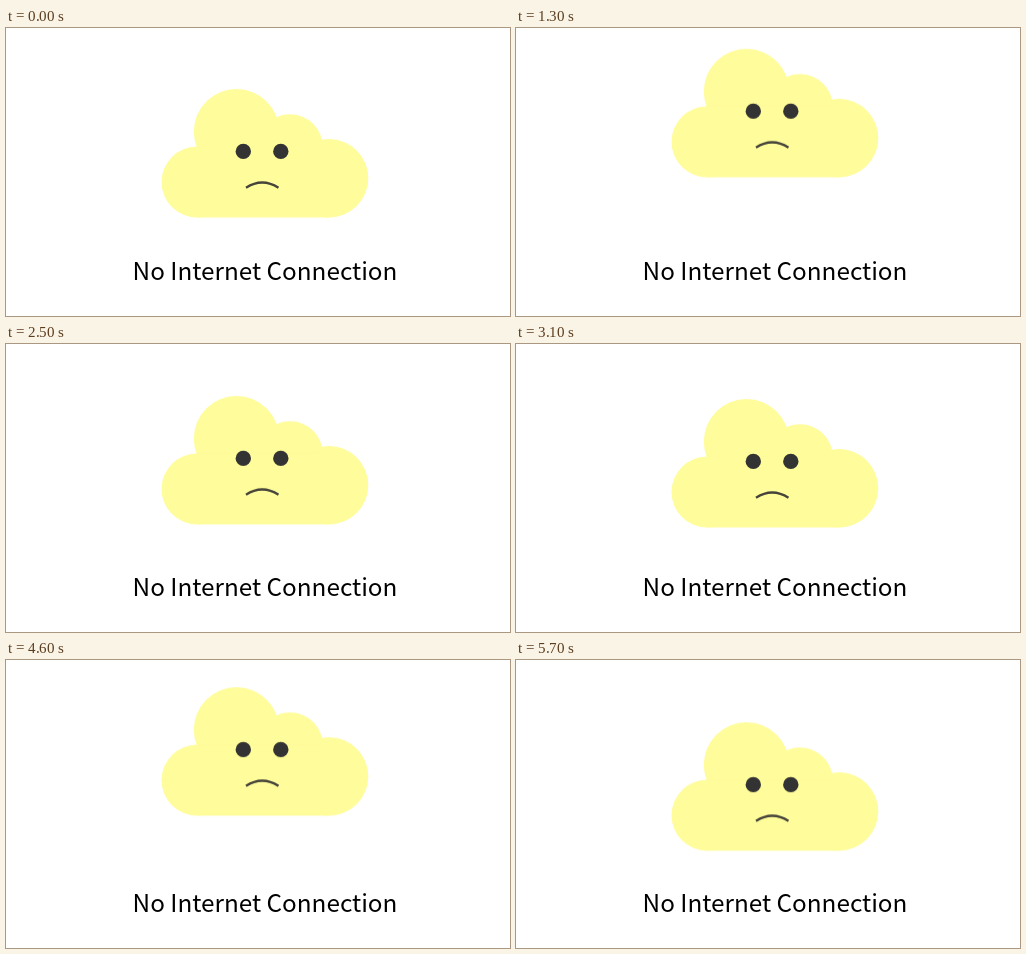
Write an HTML page that moves like this. It is 504x288 px and loops after 5800 ms.

```html
<!DOCTYPE html>
<html lang="en">
<head>
<meta charset="utf-8">
<title>No Internet Connection</title>
<style>
  html, body { margin: 0; width: 100%; height: 100%; overflow: hidden; background: #fff; }
  svg { display: block; width: 504px; height: 288px; }
  .body { fill: #fffc9b; }
  .eye { fill: #333; }
  .mouth { fill: none; stroke: #46443a; stroke-width: 2.3; }
  text {
    font: 24.3px "Noto Sans CJK SC", "Noto Sans CJK JP", "Noto Sans CJK TC", "Noto Sans CJK KR", "Open Sans", sans-serif;
    text-anchor: middle;
    fill: #000;
  }
</style>
</head>
<body>
<svg viewBox="0 0 504 288">
  <g id="cloud">
    <g class="body">
      <circle cx="191" cy="154" r="35.5"/>
      <circle cx="230.5" cy="103.7" r="42.7"/>
      <circle cx="284" cy="119" r="32.8"/>
      <circle cx="323" cy="150.2" r="39.3"/>
      <path d="M191 118.5H316L323 150V189.5H191Z"/>
    </g>
    <circle class="eye" cx="237.3" cy="123.4" r="7.7"/>
    <circle class="eye" cx="274.8" cy="123.4" r="7.7"/>
    <path class="mouth" d="M240 159.8Q256.2 149.2 272.5 159.8"/>
  </g>
  <text x="259" y="252">No Internet Connection</text>
</svg>
<script>
  const LOOP = 5800, TICK = 100;

  // [time in ms, vertical offset in px]
  const path = [
    [0, 0], [1400, -43.3], [2800, 0.2], [2900, 0.2],
    [4300, -43.4], [5700, 1.2], [LOOP, 1.2]
  ];

  const frames = path.map(([time, y], i) => {
    const next = path[i + 1];
    const ticks = next ? (next[0] - time) / TICK : 1;
    return {
      offset: time / LOOP,
      transform: `translateY(${y}px)`,
      easing: `steps(${ticks}, end)`
    };
  });

  // The one-millisecond lead keeps each tick clear of rounding at its edge.
  document.getElementById("cloud").animate(frames, {
    duration: LOOP, delay: -1, iterations: Infinity
  });
</script>
</body>
</html>
```
